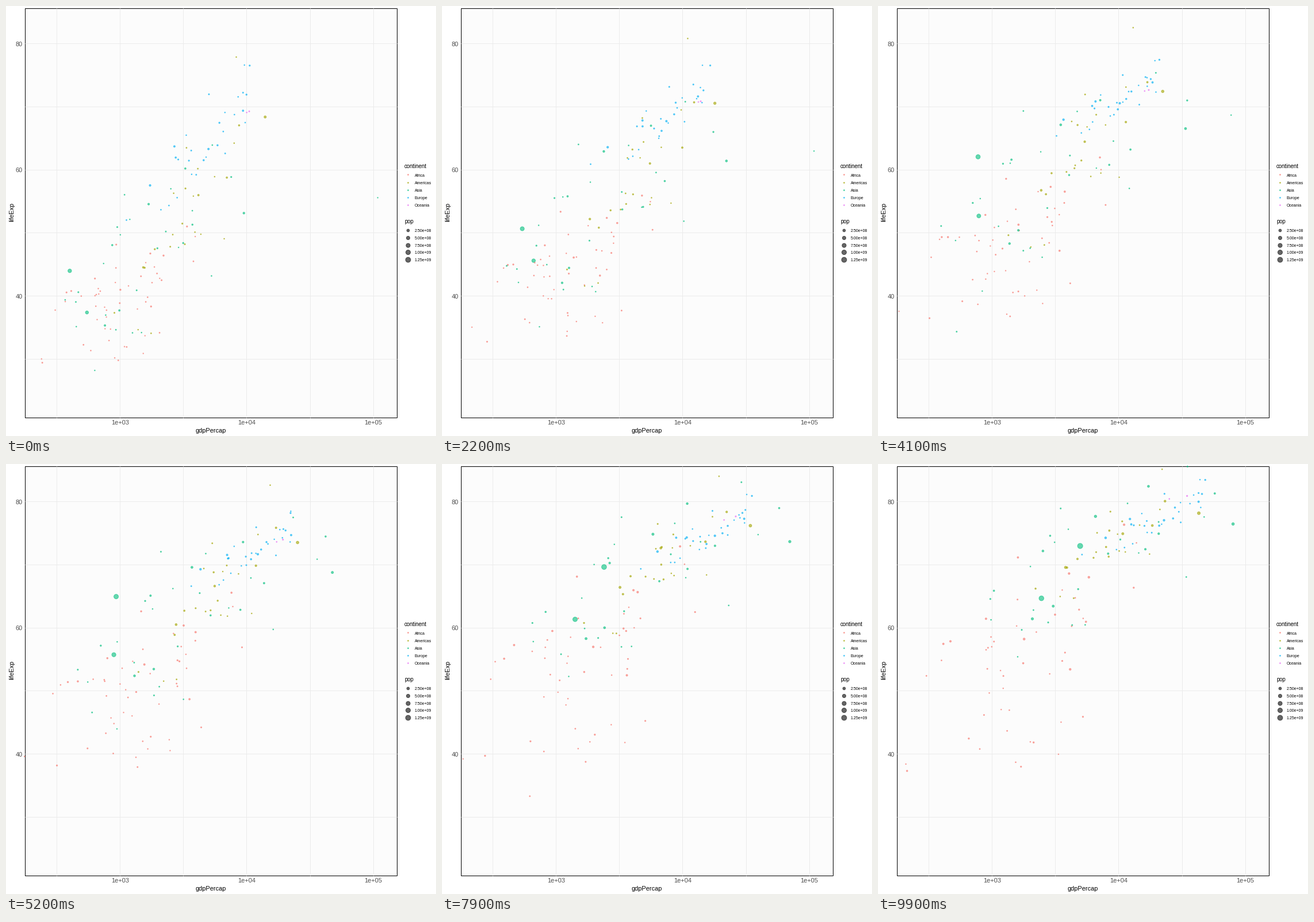
Animation of 748 by 748 pixels, one loop 10 s. Source, as a matplotlib script:

```python
import numpy as np
import matplotlib.pyplot as plt
from matplotlib.animation import FuncAnimation
from matplotlib.patches import Rectangle

SIZE, DPI = 748, 72
FRAMES, STEP = 100, 9
ALPHA, STROKE = 0.6, 0.9
YEARS = np.arange(1952, 2008, 5)
KEYS = (1952, 1970, 1989, 2007)

COLORS = {
    "Africa": "#F8766D",
    "Americas": "#A3A500",
    "Asia": "#00BF7D",
    "Europe": "#00B0F6",
    "Oceania": "#E76BF3",
}

# Dots, largest population, its fall per rank, first/last population ratio,
# then at KEYS: mean and spread of log gdp, mean and spread of life;
# last, how closely life follows gdp.
CLOUDS = {
    "Africa": (51, 110, 0.10, 0.27,
               (3.00, 3.14, 3.19, 3.25), (0.28, 0.33, 0.38, 0.42),
               (39.1, 46.2, 53.4, 54.8), (5.2, 5.8, 7.2, 9.4), 0.45),
    "Americas": (24, 170, 0.20, 0.40,
                 (3.52, 3.69, 3.79, 3.93), (0.26, 0.26, 0.26, 0.27),
                 (52.7, 61.2, 68.4, 73.4), (9.0, 7.8, 6.0, 4.2), 0.75),
    "Asia": (30, 230, 0.17, 0.37,
             (3.20, 3.45, 3.60, 3.78), (0.36, 0.47, 0.52, 0.52),
             (46.3, 56.5, 65.5, 70.7), (9.0, 9.2, 8.2, 7.6), 0.65),
    "Europe": (30, 100, 0.15, 0.75,
               (3.67, 3.97, 4.14, 4.33), (0.25, 0.22, 0.22, 0.25),
               (64.4, 70.5, 73.6, 77.6), (6.0, 3.0, 2.6, 2.9), 0.85),
    "Oceania": (2, 20, 1.60, 0.45,
                (4.01, 4.19, 4.31, 4.47), (0.01, 0.01, 0.04, 0.07),
                (69.2, 71.6, 75.3, 80.7), (0.2, 0.3, 0.8, 0.5), 0.90),
}

# Dots that stand apart: first and last population, then (year, gdp, life).
SOLOS = [
    ("Asia", 556, 1319,
     [(1952, 400, 44), (1957, 576, 50.5), (1962, 488, 44.5),
      (1967, 613, 58.4), (1982, 962, 65.5), (2007, 4959, 73)]),
    ("Asia", 372, 1110,
     [(1952, 547, 37.4), (1977, 813, 54.2), (1992, 1164, 60.2),
      (2007, 2452, 64.7)]),
    ("Americas", 157, 301, [(1952, 13990, 68.4), (2007, 42952, 78.2)]),
    ("Asia", 0.2, 2.5,
     [(1952, 108382, 55.6), (1972, 109348, 67.7), (1982, 31354, 71.3),
      (2007, 47307, 77.6)]),
    ("Asia", 4.7, 14,
     [(1952, 368, 39.4), (1967, 523, 45.4), (1977, 525, 31.2),
      (1982, 624, 51), (2007, 1714, 59.7)]),
    ("Africa", 2.5, 8.9,
     [(1952, 493, 40), (1987, 848, 44), (1992, 737, 23.6),
      (1997, 590, 36.1), (2007, 863, 46.2)]),
]


def px(log_gdp):
    return 198.5 + 220.2 * (log_gdp - 3)


def py(life):
    return 285.2 - 10.97 * (life - 60)


def area(pop):
    return (2.3 + 7.7 * np.sqrt(np.asarray(pop) / 1319) - STROKE) ** 2


def spread(rng, n):
    z = np.clip(rng.normal(size=n), -2, 2)
    return (z - z.mean()) / z.std()


def wander(rng, n):
    """A random walk per dot that starts and ends at zero."""
    walk = rng.normal(size=(len(YEARS), n)).cumsum(axis=0)
    return walk - np.linspace(walk[0], walk[-1], len(YEARS))


def cloud(rng, n, top, fall, ratio, *trend):
    *curves, follow = trend
    mx, sx, my, sy = (np.interp(YEARS, KEYS, c)[:, None] for c in curves)
    u, v = spread(rng, n), spread(rng, n)
    gdp = mx + sx * (u + 0.1 * wander(rng, n))
    rest = np.sqrt(1 - follow ** 2) * v
    life = my + sy * (follow * u + rest + 0.08 * wander(rng, n))
    pop = top * np.exp(-fall * np.arange(n))
    return gdp, life, pop * ratio ** np.linspace(1, 0, len(YEARS))[:, None]


def solo(pop0, pop1, keys):
    year, gdp, life = np.transpose(keys)
    gdp = np.interp(YEARS, year, np.log10(gdp))
    life = np.interp(YEARS, year, life)
    pop = np.linspace(pop0, pop1, len(YEARS))
    return gdp[:, None], life[:, None], pop[:, None]


rng = np.random.default_rng(12)
tracks = [solo(*s[1:]) for s in SOLOS]
dot_colors = [COLORS[s[0]] for s in SOLOS]
for name, spec in CLOUDS.items():
    tracks.append(cloud(rng, *spec))
    dot_colors += [COLORS[name]] * spec[0]
gdp, life, pop = (np.hstack(part) for part in zip(*tracks))
STOPS = np.stack([px(gdp), py(life), area(pop)], axis=-1)

# The small margin keeps the size from rounding down a pixel.
side = (SIZE + 0.01) / DPI
fig = plt.figure(figsize=(side, side), dpi=DPI, facecolor="white")
ax = fig.add_axes([0, 0, 1, 1])
ax.set(xlim=(0, SIZE), ylim=(SIZE, 0))
ax.axis("off")


def label(x, y, text, size, color="black", ha="left"):
    ax.text(x, y + 0.36 * size, text, fontsize=size, color=color, ha=ha,
            va="baseline", family="Liberation Sans")


def dots(x, y, sizes, colors):
    return ax.scatter(x, y, s=sizes, c=colors, alpha=ALPHA,
                      edgecolors=colors, linewidths=STROKE, zorder=3)


# Whole coordinates snap to the centre of that pixel.
ax.add_patch(Rectangle((33, 4), 647, 712, facecolor="#FCFCFC",
                       edgecolor="black", linewidth=1, zorder=1))
grid = dict(color="#EBEBEB", linewidth=1, zorder=2, solid_capstyle="butt")
for v in np.arange(2.5, 5.1, 0.5):
    x = np.round(px(v) - 0.2)
    ax.plot([x, x], [4, 716], **grid)
for v in range(30, 81, 10):
    y = np.floor(py(v))
    ax.plot([33, 680], [y, y], **grid)

for v in (3, 4, 5):
    label(px(v), 724.5, f"1e+0{v}", 11, "#4D4D4D", "center")
for v in (40, 60, 80):
    label(29, py(v), str(v), 11, "#4D4D4D", "right")
label(356, 738.5, "gdpPercap", 11, ha="center")
ax.text(10, 358, "lifeExp", fontsize=11, rotation=90, ha="center",
        va="center", family="Liberation Sans")

label(693, 278.5, "continent", 9.6)
for i, (name, color) in enumerate(COLORS.items()):
    y = 293.5 + 13.1 * i
    dots([698.5], [y], area(5), [color])
    label(710.5, y + 0.5, name, 7)
label(693, 375, "pop", 9.6)
for i in range(5):
    y, amount = 390 + 12.8 * i, 250 * (i + 1)
    dots([699], [y], area(amount), ["black"])
    label(710.5, y + 0.5, f"{amount * 1e6:.2e}", 7)

points = dots(STOPS[0, :, 0], STOPS[0, :, 1], STOPS[0, :, 2], dot_colors)


def update(i):
    k = min(i // STEP, len(YEARS) - 2)
    f = i / STEP - k
    now = STOPS[k] * (1 - f) + STOPS[k + 1] * f
    points.set_offsets(now[:, :2])
    points.set_sizes(now[:, 2])
    return (points,)


anim = FuncAnimation(fig, update, frames=FRAMES, interval=100, repeat=True,
                     repeat_delay=0)
plt.show()
```
